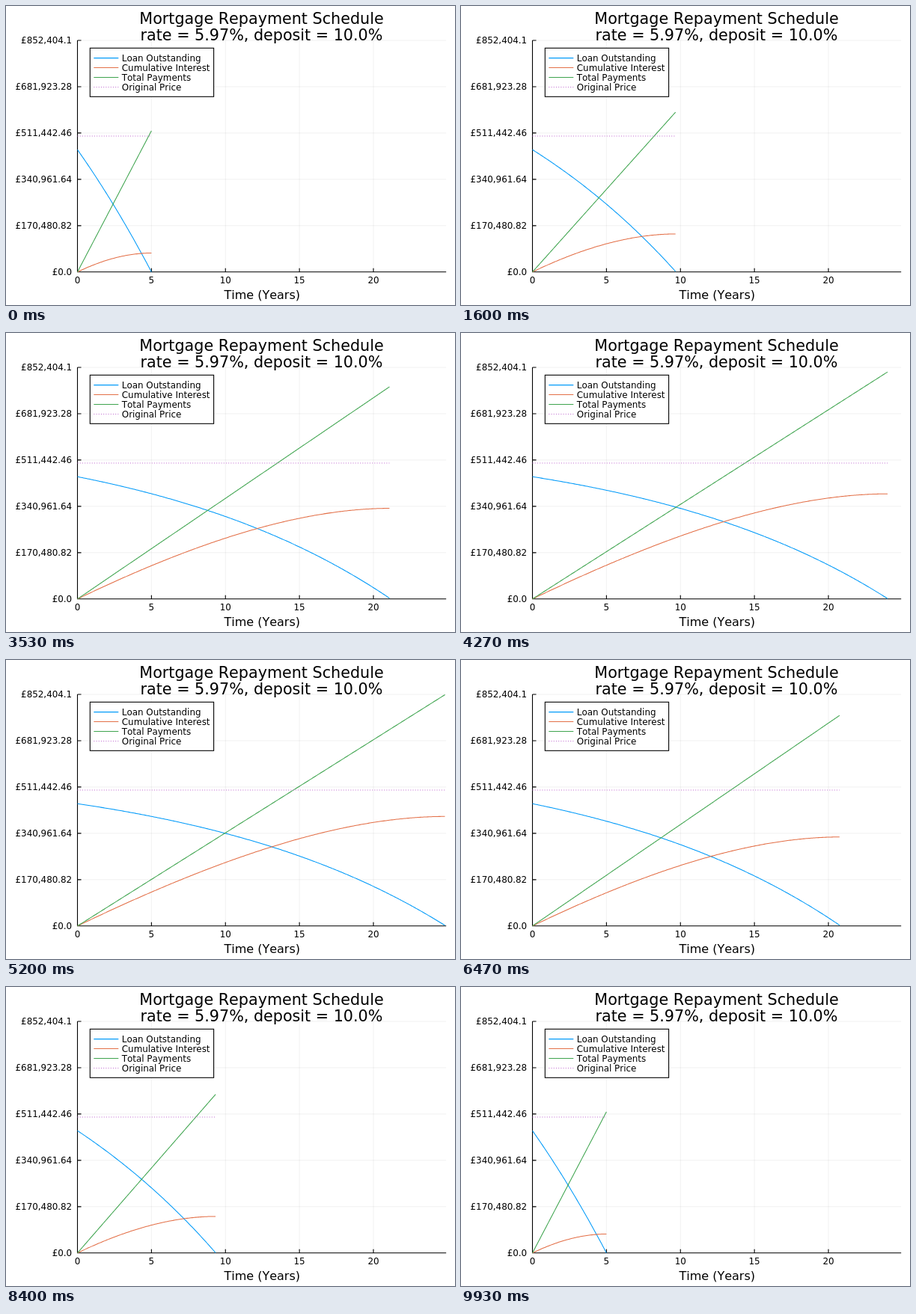
These frames come from a looping animation (600 px wide and 400 px high, 9990 ms). An HTML page:

```html
<!DOCTYPE html>
<html lang="en">
<head>
<meta charset="utf-8">
<title>Mortgage Repayment Schedule</title>
<style>
  html, body { margin: 0; width: 100%; height: 100%; overflow: hidden; background: #fff; }
  svg { display: block; width: 600px; height: 400px; }
  text { font: 11.9px "DejaVu Sans", sans-serif; font-kerning: none; fill: #000; }
  .title { font-size: 20.7px; text-anchor: middle; }
  .label { font-size: 16px; text-anchor: middle; }
  .x { text-anchor: middle; }
  .y { text-anchor: end; }
  path { fill: none; }
  .grid { stroke: #000; stroke-opacity: .1; stroke-width: .6; }
  .axis { stroke: #000; stroke-width: 1.1; }
  .line { stroke-width: 1.05; }
  .dots { stroke-dasharray: 1.1 2.1; }
  rect { fill: #fff; stroke: #000; stroke-width: 1.1; }
</style>
</head>
<body>
<svg id="chart" viewBox="0 0 600 400"></svg>
<script>
const svg = document.getElementById('chart');
const LOOP = 9990, FPS = 15, LAST = 149;
const LOAN = 450000, PRICE = 500000, GROWTH = 1.0598 ** (1 / 12);
const MAX_MONTHS = 299, MAX_Y = 852404.1;
const LEFT = 95.5, RIGHT = 588.2, TOP = 46, BOTTOM = 355.8;

const px = month => LEFT + (RIGHT - LEFT) * month / MAX_MONTHS;
const py = value => BOTTOM - (BOTTOM - TOP) * value / MAX_Y;

function add(tag, attrs, text = '') {
  const el = document.createElementNS('http://www.w3.org/2000/svg', tag);
  for (const key in attrs) el.setAttribute(key, attrs[key]);
  el.textContent = text;
  return svg.appendChild(el);
}
const label = (cls, x, y, text) => add('text', { class: cls, x, y }, text);
const path = (cls, d) => add('path', { class: cls, d });

// Grid, ticks and axes
let grid = '', axis = `M${LEFT} ${TOP}V${BOTTOM}H${RIGHT}`;
for (let year = 0; year <= 20; year += 5) {
  const x = px(year * 12);
  grid += `M${x} ${TOP}V${BOTTOM}`;
  axis += `M${x} ${BOTTOM}v-5`;
  label('x', x, 371.3, year);
}
['0.0', '170,480.82', '340,961.64', '511,442.46', '681,923.28', '852,404.1'].forEach((text, i) => {
  const y = py(MAX_Y * i / 5);
  grid += `M${LEFT} ${y}H${RIGHT}`;
  axis += `M${LEFT} ${y}h5`;
  label('y', 88.2, y + 4.3, '£' + text);
});
path('grid', grid);
path('axis', axis);

label('title', 341.5, 24, 'Mortgage Repayment Schedule');
label('title', 341.5, 46.3, 'rate = 5.97%, deposit = 10.0%');
label('label', 342.2, 392, 'Time (Years)');

// Curves over months k, for a term of n months that need not be whole
const balance = (k, n) => LOAN * (GROWTH ** n - GROWTH ** k) / (GROWTH ** n - 1);
const paid = (k, n) => k * LOAN * (GROWTH - 1) / (1 - GROWTH ** -n);
const interest = (k, n) => paid(k, n) - LOAN + balance(k, n);

const series = [
  ['Loan Outstanding', '#009af9', balance],
  ['Cumulative Interest', '#e36f47', interest],
  ['Total Payments', '#3ea44e', paid],
  ['Original Price', '#c371d2', () => PRICE]
].map(([name, color, value], i) => {
  const cls = i === 3 ? 'line dots' : 'line';
  return { name, color, value, cls, el: add('path', { class: cls, stroke: color }) };
});

// Legend
add('rect', { x: 112.3, y: 56.3, width: 165.3, height: 65 });
series.forEach(({ name, color, cls }, i) => {
  const y = 69.6 + i * 12.95;
  add('path', { class: cls, stroke: color, d: `M117.3 ${y}H150.3` });
  label('', 154.8, y + 4.2, name);
});

function curve(value, term) {
  let d = '';
  for (let k = 0; k <= term; k++) {
    d += `${k ? 'L' : 'M'}${px(k).toFixed(2)} ${py(value(k, term)).toFixed(2)}`;
  }
  return d;
}

let shown = -1;
function draw(now) {
  const step = Math.min(LAST, Math.floor((now % LOOP + 5) * FPS / 1000));
  if (step !== shown) {
    shown = step;
    const term = 180 - 120 * Math.cos(2 * Math.PI * step / LAST);
    for (const s of series) s.el.setAttribute('d', curve(s.value, term));
  }
}

const start = performance.now();
function tick() {
  draw(performance.now() - start);
  requestAnimationFrame(tick);
}
tick();
</script>
</body>
</html>
```
